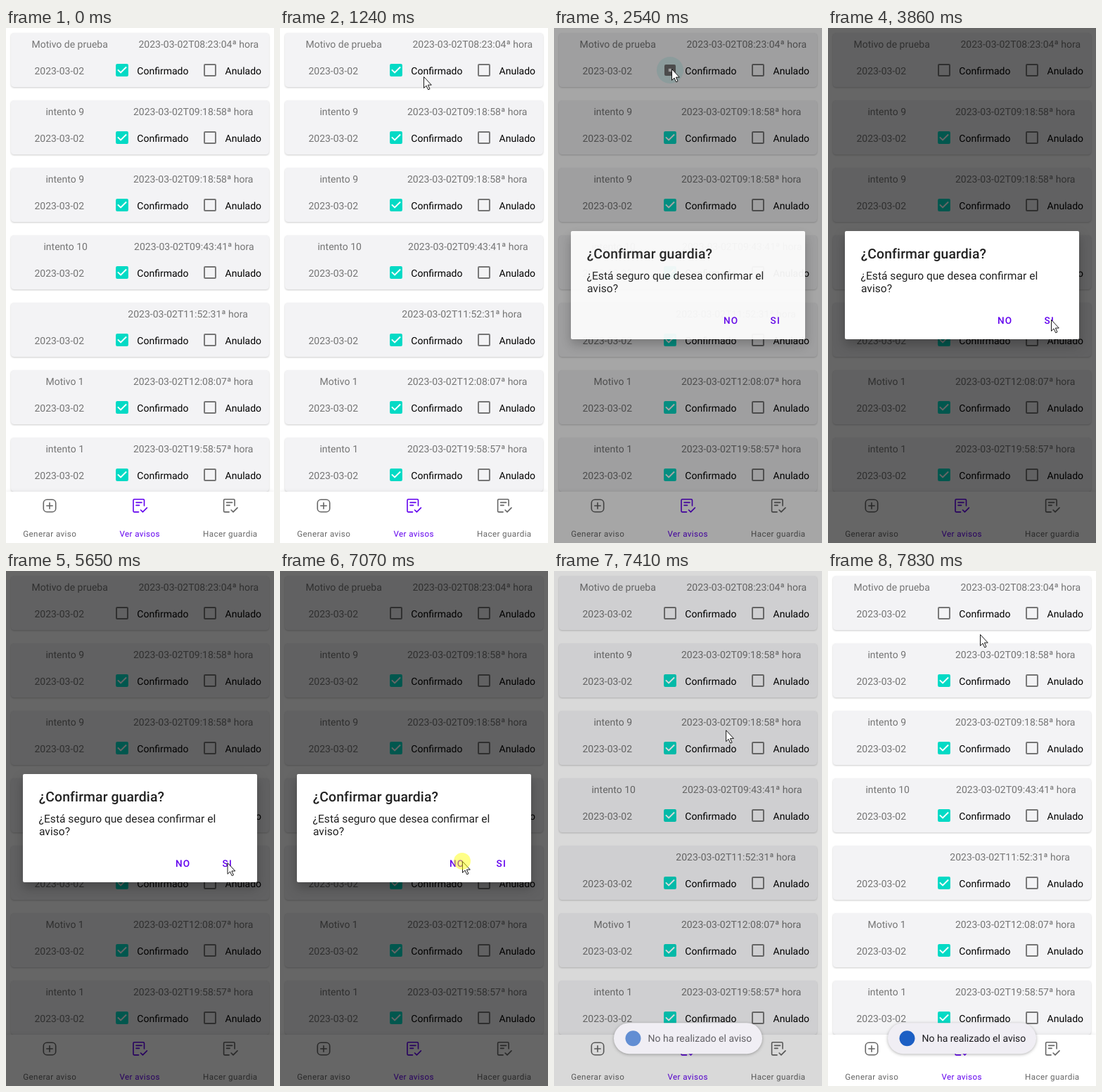
Write an HTML page that moves like this. It is 381 by 733 pixels and loops after 8000 ms.

```html
<!DOCTYPE html>
<html lang="es">
<head>
<meta charset="utf-8">
<style>
html, body { margin: 0; width: 100%; height: 100%; overflow: hidden; background: #fff; }
svg { display: block; width: 381px; height: 733px; font: 14px Roboto, sans-serif; text-rendering: geometricPrecision; }
.grey { fill: #757575; }
.card { fill: #f3f3f5; filter: drop-shadow(0 1px 1px rgba(0,0,0,.2)); }
.nav { fill: #fff; filter: drop-shadow(0 -1px 2px rgba(0,0,0,.06)); }
.label { font-size: 11.64px; letter-spacing: .39px; text-anchor: middle; }
.icon { fill: none; stroke-width: 1.6; stroke-linecap: round; stroke-linejoin: round; }
.sheet { fill: #fff; filter: drop-shadow(0 8px 8px rgba(0,0,0,.25)); }
.title { font-size: 19.4px; font-weight: 500; letter-spacing: .1px; }
.body { font-size: 15.6px; }
.button { font-size: 13.57px; font-weight: 500; letter-spacing: 1.21px; fill: #6200ee; }
.pill { fill: #f0eef4; filter: drop-shadow(0 1px 2px rgba(0,0,0,.3)); }
</style>
</head>
<body>
<svg id="stage" viewBox="0 0 381 733"></svg>
<script>
const LOOP = 8000, STEP = 70;
const GREY = '#666', PURPLE = '#6200ee';

const $ = id => document.getElementById(id);
const text = (x, y, s, cls = '') => `<text x="${x}" y="${y}" class="${cls}">${s}</text>`;
const square = (size, attrs) =>
  `<rect x="${-size / 2}" y="${-size / 2}" width="${size}" height="${size}" ${attrs}/>`;

const emptyBox = square(15.9, 'rx="1" fill="none" stroke="#757575" stroke-width="1.95"');
const checkedBox = square(17.8, 'rx="2" fill="#03dac5"') +
  '<path d="M-6.1-.7L-1.9 3.5 6.1-4.5" fill="none" stroke="#fff" stroke-width="1.9"/>';
const box = (x, content, id = '') => `<g id="${id}" transform="translate(${x} 60)">${content}</g>`;

const rows = [
  ['Motivo de prueba', '08:23:04'],
  ['intento 9', '09:18:58'],
  ['intento 9', '09:18:58'],
  ['intento 10', '09:43:41'],
  ['', '11:52:31'],
  ['Motivo 1', '12:08:07'],
  ['intento 1', '19:58:57']
];

const row = ([title, time], i) => `<g transform="translate(0 ${96 * i})">
  <rect class="card" x="7" y="7" width="367" height="77" rx="4.5"/>
  ${text(0, 28, title, 'grey heading')}${text(0, 28, `2023-03-02T${time}ª hora`, 'grey')}
  ${text(40.4, 66, '2023-03-02', 'grey')}
  ${box(165, checkedBox, i ? '' : 'toggle')}${text(186.3, 66, 'Confirmado')}
  ${box(290, emptyBox)}${text(311.6, 66, 'Anulado')}</g>`;

const plusIcon = square(17.4, 'rx="4.8"') + '<path d="M-4.2 0H4.2M0-4.2V4.2"/>';
const listIcon = '<path d="M-1.5 8.9H-7.5Q-9 8.9-9 7.4V-7.8Q-9-9.3-7.5-9.3H5Q6.5-9.3 6.5-7.8V0M-5-4.6H3M-5-.6H-.5M1.5 6L4.4 8.9 10.4 2.9"/>';

const tab = (x, label, icon, color) => `<g transform="translate(${x} 680)">
  <g class="icon" stroke="${color}">${icon}</g>
  <text class="label" x=".2" y="44" fill="${color}">${label}</text></g>`;

$('stage').innerHTML = `
  ${rows.map(row).join('')}
  <rect class="nav" y="660" width="381" height="74"/>
  ${tab(62, 'Generar aviso', plusIcon, GREY)}
  ${tab(190, 'Ver avisos', listIcon, PURPLE)}
  ${tab(318.6, 'Hacer guardia', listIcon, GREY)}
  <rect id="scrim" width="381" height="733"/>
  <g id="dialog" fill="#212121">
    <rect class="sheet" x="24" y="289" width="333" height="154" rx="2"/>
    ${text(46.8, 327.5, '¿Confirmar guardia?', 'title')}
    ${text(46.6, 357.5, '¿Está seguro que desea confirmar el', 'body')}
    ${text(47, 376, 'aviso?', 'body')}
    ${text(241, 420.7, 'NO', 'button')}${text(307.5, 420.7, 'SI', 'button')}
  </g>
  <g id="toast">
    <rect class="pill" x="-105.5" y="-22" width="211" height="44" rx="22"/>
    <g id="message" fill="#1c1b1f">
      <circle cx="-78" r="11" fill="#1c5fc4"/>
      ${text(-57, 5, 'No ha realizado el aviso')}
    </g>
  </g>
  <path id="cursor" d="M.5 .5V16.4L4 13 6.7 18.8 9 17.8 6.4 12.1H11.3Z" fill="#fff" stroke="#000" stroke-width=".9"/>
  <circle id="click" r="12" fill="#ff0" fill-opacity=".47"/>`;

// Free space in a card is shared out, so the title's width moves both texts.
for (const heading of document.querySelectorAll('.heading')) {
  const w = heading.getComputedTextLength();
  heading.setAttribute('x', 76.6 - .37 * w);
  heading.nextElementSibling.setAttribute('x', 173.3 + .14 * w);
}

// The screen refreshes every STEP ms inside these spans and rests between them.
const bursts = [[0, 0], [460, 1240], [1310, 1590], [2330, 3100], [3170, 3860], [5650, 5990], [7270, 7830]];
const sample = t => {
  const [start, end] = bursts.filter(b => b[0] <= t).pop();
  return Math.min(end, start + Math.floor((t - start) / STEP) * STEP);
};

const ramp = (t, from, to) => Math.min(1, Math.max(0, (t - from) / (to - from)));
const easeOut = u => 1 - (1 - u) ** 3;

// Pointer legs: start, end, destination, and the x the path bends towards.
const legs = [
  { from: 460, to: 1240, x: 204, y: 69, bend: 310 },
  { from: 1240, to: 1590, x: 167, y: 58, bend: 185 },
  { from: 2680, to: 3860, x: 317, y: 415, bend: 312 },
  { from: 5645, to: 5990, x: 259, y: 413, bend: 288 },
  { from: 7270, to: 7830, x: 216, y: 90, bend: 258 }
];

function pointer(t) {
  let x = 325, y = 695;
  for (const leg of legs) {
    const u = easeOut(ramp(t, leg.from, leg.to)), v = 1 - u;
    x = v * v * x + 2 * u * v * leg.bend + u * u * leg.x;
    y = v * y + u * leg.y;
  }
  return [x, y];
}

function toggle(t) {
  const radius = 19 * ramp(t, 2260, 2430), alpha = .12 * (1 - ramp(t, 2610, 2890));
  const wave = `<circle r="${radius}" fill="#03c8c5" opacity="${alpha}"/>`;
  if (t < 2400) return wave + checkedBox;
  if (t >= 2750) return wave + emptyBox;
  return wave + square(16, 'rx="2" fill="#757575"') +
    square(14 * ramp(t, 2280, 2750) ** 2, 'fill="#f3f3f5"');
}

const set = (id, name, value) => $(id).setAttribute(name, value);
const fade = (id, value) => set(id, 'opacity', +value);
const clicked = (t, at) => t >= at && t < at + STEP;

function draw(now) {
  const real = now % LOOP, t = sample(real);
  const closing = ramp(t, 7200, 7330);
  const at = `translate(${pointer(t).join(' ')})`;
  set('cursor', 'transform', at);
  set('click', 'transform', at);
  fade('cursor', real >= 460);
  fade('click', clicked(real, 2120) || clicked(real, 7070));
  $('toggle').innerHTML = toggle(t);
  fade('scrim', .6 * (ramp(t, 2400, 2640) - ramp(t, 7200, 7480)));
  fade('dialog', ramp(t, 2400, 2550) - closing);
  fade('toast', ramp(t, 7200, 7285));
  fade('message', ramp(t, 7270, 7480));
  set('toast', 'transform', `translate(190.5 665.2) scale(${.9 + .1 * closing})`);
}

const begin = performance.now();
function tick() {
  draw(performance.now() - begin);
  requestAnimationFrame(tick);
}
tick();
</script>
</body>
</html>
```
